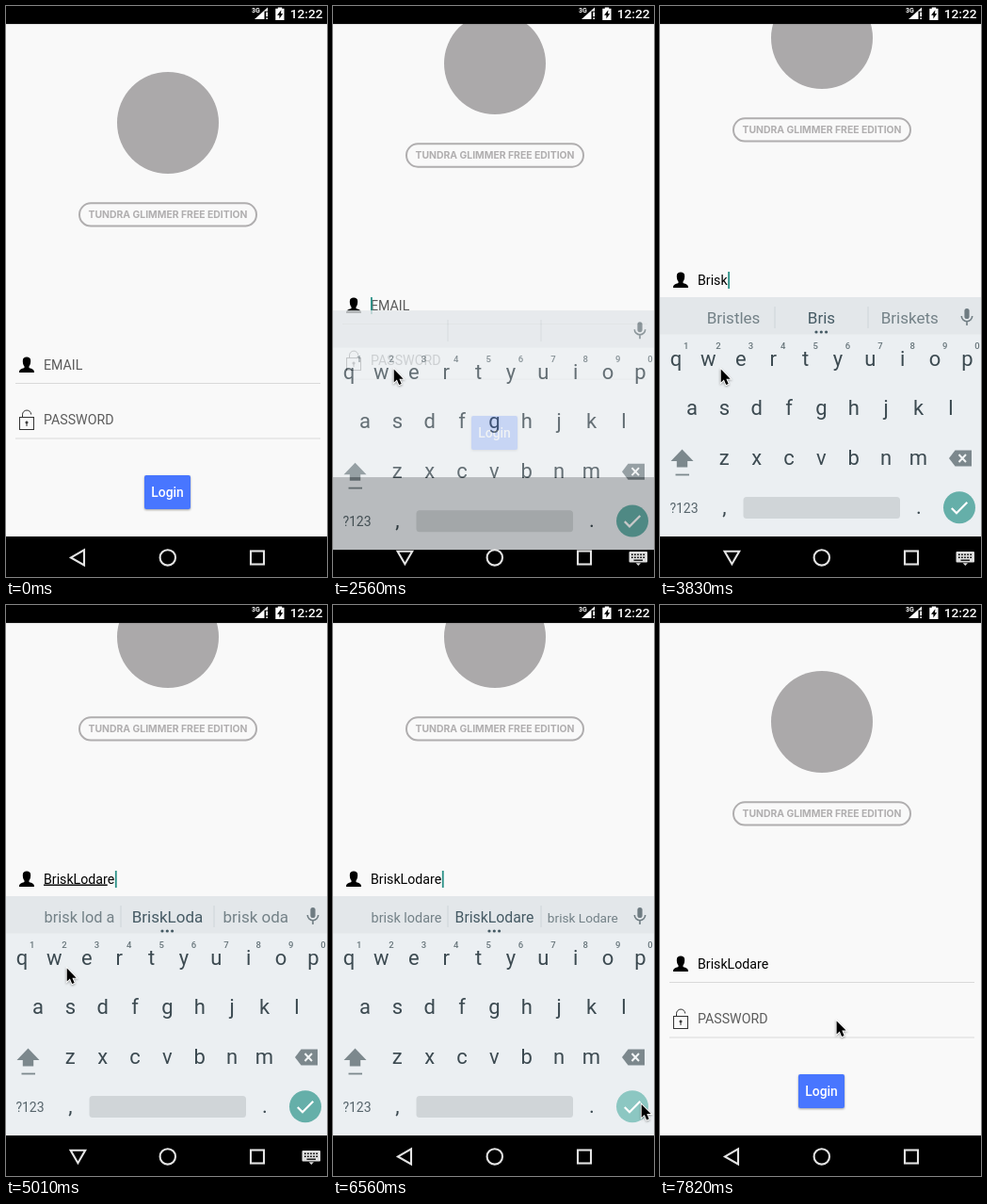
These frames come from a looping animation (341 by 606 pixels, 8000 ms). An HTML page:

```html
<!DOCTYPE html>
<html lang="en">
<head>
<meta charset="utf-8">
<title>Login form</title>
<style>
  html, body { margin: 0; width: 100%; height: 100%; overflow: hidden; background: #000; }
  svg { display: block; width: 100vw; height: 100vh; font-family: Roboto, "Noto Sans", sans-serif; }
  text { white-space: pre; }
  .mid { text-anchor: middle; }
  .line { fill: none; stroke: #e4e4e4; stroke-width: 2.1; }
  #login { filter: drop-shadow(0 1.5px 1.3px rgba(0, 0, 0, .35)); }
  #pointer { filter: drop-shadow(0 1px 1px rgba(0, 0, 0, .35)); }
</style>
</head>
<body>
<svg id="stage" viewBox="0 0 341 606">
  <rect width="341" height="606"/>

  <g id="app">
    <rect width="341" height="563" fill="#f9f9f9"/>
    <circle cx="172" cy="124" r="54" fill="#aba9aa"/>
    <rect x="78" y="209.3" width="188" height="24.3" rx="12.15" fill="none" stroke="#b0aeaf" stroke-width="2"/>
    <text class="mid" x="172" y="225.3" font-family="Inter, sans-serif" font-weight="700" font-size="10.4" fill="#b0aeaf">TUNDRA GLIMMER FREE EDITION</text>

    <path d="M14 389C14 385.6 16 385.3 19.5 384V382.4C18 380.6 17.8 378 17.8 376.4C17.8 373.6 19.6 372.5 22 372.5S26.2 373.6 26.2 376.4C26.2 378 26 380.6 24.5 382.4V384C28 385.3 30 385.6 30 389Z"/>
    <g fill="none" stroke="#333" stroke-width="1">
      <rect x="14.5" y="436.5" width="15" height="13"/>
      <path d="M17.5 436.5V433.8A4.6 4.6 0 0 1 26.7 433.5"/>
      <path d="M22 442.5V446"/>
      <circle cx="22" cy="442" r="1.1" fill="#333"/>
    </g>
    <path d="M10 400.5H334M10 459H334" stroke="#d9d9d9"/>
    <text id="hint" x="40" y="385.5" font-size="14.2" fill="#5c5c5c">EMAIL</text>
    <text id="entry" x="40" y="385.5" font-size="14.2"><tspan id="marked" text-decoration="underline"></tspan><tspan id="plain"></tspan></text>
    <text x="40" y="444" font-size="14.2" fill="#5c5c5c">PASSWORD</text>
    <rect id="caret" width="1.8" height="18" fill="#2a9187"/>

    <rect id="login" x="147" y="498" width="49" height="36" rx="2" fill="#4876ff"/>
    <text class="mid" x="171.5" y="521.2" font-size="13.9" font-weight="500" fill="#fff">Login</text>
  </g>

  <rect width="341" height="19.1"/>
  <g fill="#fff">
    <path d="M264 14L278 1.5V14Z"/>
    <rect x="274.5" y="5.5" width="5" height="9" fill="#000"/>
    <path d="M276.3 6.5H278V11.2H276.3ZM276.3 12.4H278V14H276.3Z"/>
    <path d="M288.8 2.8V1.5H293.2V2.8H295.5V15H286.3V2.8Z"/>
    <path d="M292.4 4.2L288 9.8H290.4V13.6L294.2 8H292Z" fill="#000"/>
    <text x="261" y="7" font-size="7" font-weight="700">3G</text>
    <text x="301.7" y="12.8" font-size="13.7" font-weight="500">12:22</text>
  </g>

  <g id="keyboard">
    <rect y="309" width="341" height="254" fill="#ebeff2"/>
    <rect y="309" width="341" height="39.5" fill="#e3e7ea"/>
    <path d="M122 319V342M221 319V342" stroke="#cdd4d8"/>
    <g fill="#6f7c82">
      <rect x="323.4" y="321" width="5.2" height="11" rx="2.6"/>
      <path d="M320.3 329A5.7 5.7 0 0 0 331.7 329M326 335V339" fill="none" stroke="#6f7c82" stroke-width="1.6"/>
    </g>
    <g id="picks" class="mid" fill="#738187">
      <text x="78" y="337.4"></text>
      <text x="171.5" y="337.4" fill="#455a64"></text>
      <text x="265.3" y="337.4"></text>
    </g>
    <g id="dots" fill="#455a64">
      <circle cx="166" cy="346" r="1.6"/><circle cx="171.3" cy="346" r="1.6"/><circle cx="176.6" cy="346" r="1.6"/>
    </g>
    <g id="keys" class="mid" fill="#3c4a51"></g>
    <path d="M23.5 470.5L35.5 483H29.2V489.5H17.8V483H11.5Z" fill="#7c888d"/>
    <path d="M16.5 497.5H31" stroke="#7c888d" stroke-width="1.8"/>
    <path d="M307 480L313.5 471.5H331V488.5H313.5Z" fill="#7c888d"/>
    <path d="M317.5 476L325 484M325 476L317.5 484" stroke="#f2f5f6" stroke-width="2"/>
    <rect x="88.5" y="521" width="166.5" height="23" rx="3.5" fill="#d0d5d8"/>
    <circle id="done" cx="318" cy="532.3" r="17"/>
    <path d="M309.8 533L315 538.2L326.3 526.8" fill="none" stroke="#fff" stroke-width="2.2"/>
  </g>

  <path id="back" class="line" d="M69 585.4L83 577.4V593.4Z"/>
  <path id="down" class="line" d="M68.6 578.8H84.2L76.4 592.2Z"/>
  <circle class="line" cx="171.8" cy="585.4" r="8.2"/>
  <rect class="line" x="260" y="578.5" width="14" height="14"/>
  <g id="imeIcon">
    <rect x="314.5" y="579" width="19.5" height="11.5" rx="1" fill="#ddd"/>
    <path d="M317 582.2H332M317 585.2H332" stroke="#000" stroke-width="1.5" stroke-dasharray="1.6 1.5"/>
    <path d="M319.5 588.2H329" stroke="#000" stroke-width="1.3"/>
    <path d="M321.7 591.3H327L324.3 594Z" fill="#ddd"/>
  </g>

  <path id="pointer" d="M0 0V14L3.2 11L5.5 16.5L8 15.5L5.7 10.1H10Z" stroke="#fff" stroke-width="1.8" paint-order="stroke"/>
</svg>

<script>
const LOOP = 8000;
const WORD = "BriskLodare";
const TYPED = [3220, 3370, 3520, 3670, 3810, 4070, 4420, 4570, 4720, 4880, 5010];
const PICK_LAG = 140, MARK_LAG = 30;
const PICKS = [
  ["", ""], ["By", "But"], ["Bring", "Brown"], ["Bring", "Bright"], ["Bristles", "Briskets"],
  ["Briskly", "Risk"], ["brisk l", "Briskly"], ["brisk lo", "brisk low"], ["brisk lod", "brisk old"],
  ["brisk lod a", "brisk oda"], ["brisk lodar", "brisk odar"], ["brisk lodare", "brisk Lodare"]
];
// time, x, y
const PATH = [
  [1320, 174, 587], [1620, 64.7, 388.5], [2030, 64.7, 388.5], [2120, 64.7, 385.6],
  [5570, 64.7, 385.6], [5880, 263, 440], [6110, 263, 440], [6480, 327.7, 530],
  [6720, 327.7, 530], [6980, 273, 442], [7340, 187, 442], [7810, 187, 442], [7820, 187.6, 441.5]
];

const $ = id => document.getElementById(id);
const clamp = v => Math.max(0, Math.min(1, v));
const within = (t, a, b) => t >= a && t < b;
const show = (el, on) => el.setAttribute("visibility", on ? "visible" : "hidden");
const easeOut = v => 1 - (1 - v) ** 2;
const smooth = v => v * v * (3 - 2 * v);

function addKey(label, x, y, size, extra = "") {
  $("keys").insertAdjacentHTML("beforeend",
    `<text x="${x}" y="${y}" font-size="${size}" ${extra}>${label}</text>`);
}

function buildKeys() {
  const step = 34.37;
  [["qwertyuiop", 17, 382], ["asdfghjkl", 34, 434], ["zxcvbnm", 68.3, 486.5]].forEach(([row, x, y]) =>
    [...row].forEach((c, i) => addKey(c, x + i * step, y, 22)));
  [..."1234567890"].forEach((c, i) =>
    addKey(c, 27.7 + i * step, 363.8, 9.5, 'font-weight="500" fill="#67757b"'));
  addKey("?123", 25.5, 537.5, 14, 'fill="#56646b"');
  addKey(",", 68.3, 539, 22);
  addKey(".", 275, 539, 22);
}

const count = t => TYPED.filter(k => k <= t).length;

let lastPick = -1;
function setPicks(n) {
  if (n === lastPick) return;
  lastPick = n;
  const words = [PICKS[n][0], WORD.slice(0, n), PICKS[n][1]];
  [...$("picks").children].forEach((el, i) => {
    const room = i === 1 ? 84 : 75;
    el.textContent = words[i];
    el.setAttribute("font-size", 17);
    const w = el.getComputedTextLength();
    if (w > room) el.setAttribute("font-size", 17 * room / w);
  });
  show($("dots"), n > 0);
}

function pointerAt(t) {
  const i = PATH.findIndex(p => p[0] > t);
  if (i < 0) return PATH[PATH.length - 1].slice(1);
  const [a, b] = [PATH[i - 1], PATH[i]];
  const u = smooth((t - a[0]) / (b[0] - a[0]));
  return [a[1] + (b[1] - a[1]) * u, a[2] + (b[2] - a[2]) * u];
}

function drawEntry(t) {
  const n = count(t);
  const marked = within(t, 3950, 6480) ? count(t - MARK_LAG) : 0;
  $("marked").textContent = WORD.slice(0, marked);
  $("plain").textContent = WORD.slice(marked, n);
  show($("hint"), n === 0);

  const inPassword = within(t, 7520, 7610);
  const lit = within(t, 2380, 2890) || within(t, 3220, 5570) ||
    within(t, 6120, 6620) || within(t, 7120, 7610);
  const end = n ? $("entry").getComputedTextLength() + 0.6 : 0;
  $("caret").setAttribute("x", inPassword ? 40 : 40 + end);
  $("caret").setAttribute("y", inPassword ? 430 : 372);
  show($("caret"), lit);
}

function draw(t) {
  const up = t < 6680
    ? easeOut(clamp((t - 2430) / 290))
    : 1 - easeOut(clamp((t - 6680) / 240));
  $("app").setAttribute("transform", `translate(0 ${-90 * up})`);
  $("keyboard").setAttribute("transform", `translate(0 ${47 * (1 - up)})`);
  $("keyboard").setAttribute("opacity", Math.min(1, 1.12 * up));
  $("done").setAttribute("fill", t >= 6480 ? "#8cc7c2" : "#65afa9");

  const open = within(t, 2430, 6540);
  show($("down"), open);
  show($("imeIcon"), open);
  show($("back"), !open);

  drawEntry(t);
  setPicks(count(t - PICK_LAG));

  show($("pointer"), t >= PATH[0][0]);
  if (t >= PATH[0][0]) {
    const [x, y] = pointerAt(t);
    $("pointer").setAttribute("transform", `translate(${x} ${y})`);
  }
}

buildKeys();
function tick() {
  draw(performance.now() % LOOP);
  requestAnimationFrame(tick);
}
tick();
</script>
</body>
</html>
```
